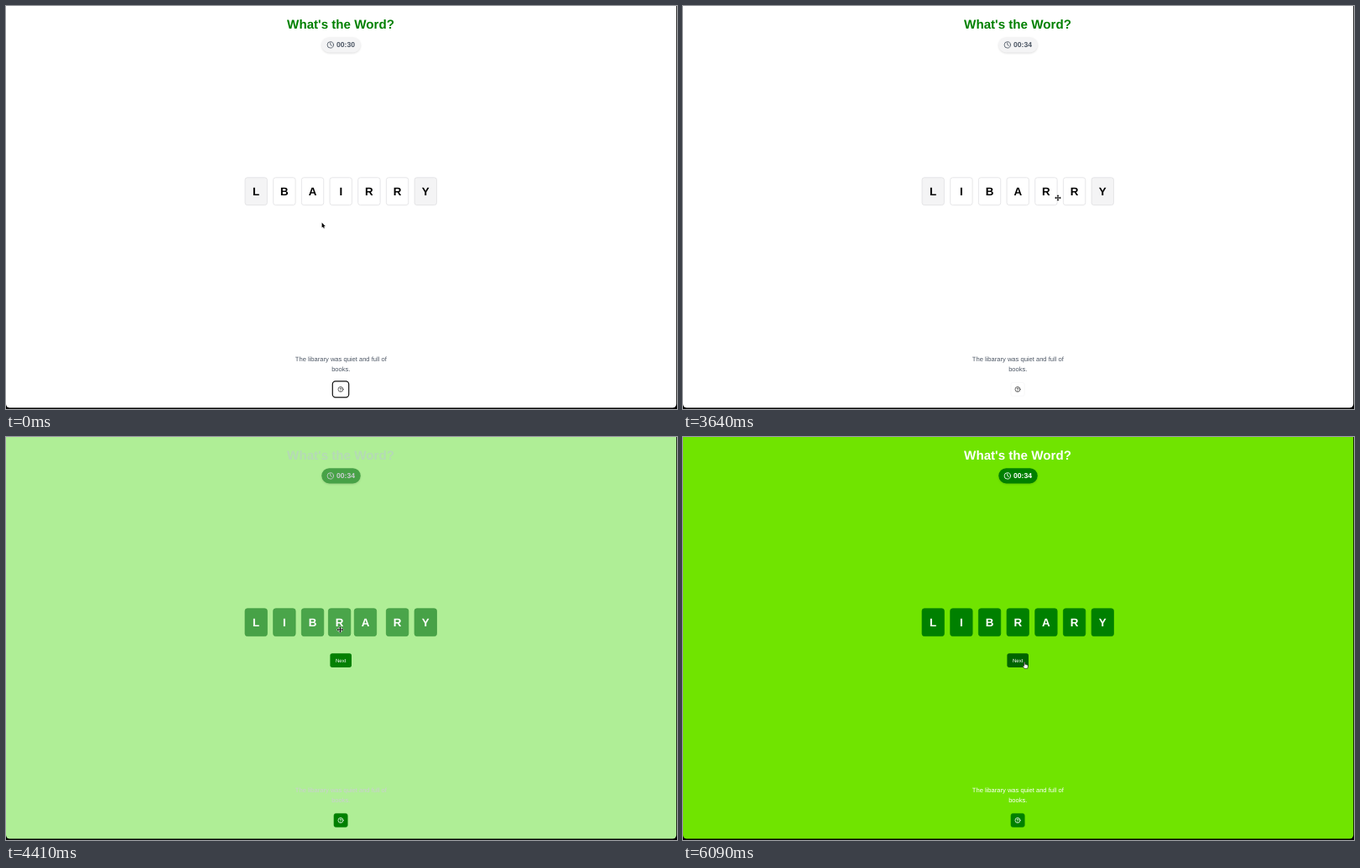
An HTML page for the animation above (6.16 s loop, 800x481 px).

```html
<!DOCTYPE html>
<html lang="en">
<head>
<meta charset="utf-8">
<title>Word game</title>
<style>
  html, body { margin: 0; width: 100%; height: 100%; overflow: hidden; background: #000; }
  svg { display: block; width: 800px; height: 481px; }
  text { font-family: "Liberation Sans", Arial, sans-serif; text-anchor: middle; text-rendering: geometricPrecision; }
  .bold { font-weight: bold; }
  #pill { filter: drop-shadow(0 1px 1px rgba(0, 0, 0, .13)); }
</style>
</head>
<body>
<svg viewBox="0 0 800 481">
  <rect width="800" height="481"/>
  <rect id="page" x="0" y="-10" width="799.2" height="489.5" rx="4.5"/>
  <text id="title" class="bold" x="399" y="27.4" font-size="15.15">What's the Word?</text>
  <rect id="pill" x="376.3" y="37.2" width="46.4" height="18.2" rx="9.1"/>
  <g id="clock" fill="none" stroke-width=".85" stroke-linecap="round">
    <circle cx="386.8" cy="46.4" r="3.7"/>
    <path d="M386.8 44V46.4L388.4 47.3"/>
  </g>
  <text id="time" class="bold" x="405" y="49.4" font-size="8.6"></text>
  <g id="tiles"></g>
  <g id="next">
    <rect id="nextBox" x="386.4" y="258.3" width="25.6" height="16.6" rx="2.6"/>
    <text x="399.2" y="268.8" font-size="6.1" fill="#fff">Next</text>
  </g>
  <g id="hint" font-size="7.57">
    <text x="399.3" y="424">The libarary was quiet and full of</text>
    <text x="399.3" y="435.8">books.</text>
  </g>
  <rect id="focus" x="389.3" y="447.8" width="19.4" height="19.4" rx="3.6" fill="#fff" stroke="#111" stroke-width="1.2"/>
  <rect id="help" x="391" y="449.4" width="16.2" height="16.2" rx="2.4" stroke-width=".6"/>
  <g id="helpIcon" fill="none" stroke-width=".75" stroke-linecap="round">
    <circle cx="399" cy="457.5" r="3"/>
    <path d="M398.1 456.8Q398.2 455.9 399.1 455.9T400 456.8Q399.9 457.3 399 457.9M399 459.1V459.2"/>
  </g>
  <g id="cursor" stroke-linejoin="round">
    <path d="M0 0V6L1.4 4.8L2.3 6.8L3.2 6.4L2.4 4.5H4.2Z" fill="#000" stroke="#fff" stroke-width=".5" paint-order="stroke"/>
    <g id="move"></g>
    <path d="M-.6 .3Q0-.5 .6 .3V2.8Q1.6 2.3 2 3Q3 2.7 3.3 3.5Q4.3 3.5 4.2 4.4L3.6 7.6H-.2L-2.2 4.8Q-2 4.1 -.6 4.7Z" fill="#fff" stroke="#000" stroke-width=".55"/>
  </g>
</svg>
<script>
const LOOP = 6160, SOLVED = 4175, FADE = 520;
const $ = id => document.getElementById(id);
const set = (el, name, value) => el.setAttribute(name, value);
const WHITE = [255, 255, 255], GREEN = [0, 128, 0], LIME = [112, 228, 0];
const PALE = [244, 244, 245], LINE = [222, 222, 224], SLATE = [75, 85, 99];

const ramp = (t, from, span) => Math.max(0, Math.min(1, (t - from) / span));
const lerp = (a, b, p) => a.map((v, i) => v + (b[i] - v) * p);
const rgb = c => `rgb(${c.map(Math.round)})`;
const mix = (a, b, p) => rgb(lerp(a, b, p));
const square = c => c.map(v => v * v);
const mixSquared = (a, b, p) => rgb(lerp(square(a), square(b), p).map(Math.sqrt));

function bezier(x1, y1, x2, y2) {
  const at = (a, b, s) => 3 * a * s * (1 - s) ** 2 + 3 * b * s * s * (1 - s) + s ** 3;
  return x => {
    let lo = 0, hi = 1;
    for (let i = 0; i < 20; i++) {
      const mid = (lo + hi) / 2;
      if (at(x1, x2, mid) < x) lo = mid; else hi = mid;
    }
    return x <= 0 ? 0 : x >= 1 ? 1 : at(y1, y2, lo);
  };
}
const easeOut = bezier(0, 0, .58, 1), standard = bezier(.4, 0, .2, 1);
const smooth = x => x * x * (3 - 2 * x);

// Each move: start, end, goal
const travel = (t, from, moves) => moves.reduce(
  (at, [start, end, ...goal]) => lerp(at, goal, smooth(ramp(t, start, end - start))), from);

const slot = i => 298.2 + 33.68 * i;
const shift = (t, start, from) => slot(from + standard(ramp(t, start, 400)));
const dragI = t => travel(t, [slot(3)], [[1960, 2450, 337], [2540, 2680, slot(1)]])[0];
const dragR = t => travel(t, [slot(4)], [[3850, 4270, 400.5], [4270, 4410, 397.6], [4550, 4690, slot(3)]])[0];
const pointer = t => travel(t, [376.6, 258.6], [
  [1330, 1820, 400, 228],
  [1960, 2450, 337, 227],
  [2590, 3290, 447, 229],
  [3850, 4270, 400.6, 230],
  [4270, 4410, 398.4, 230],
  [4410, 4550, 400.6, 230],
  [4550, 4690, 428, 249.5],
  [4690, 5530, 440, 268],
  [6020, 6085, 407.2, 268.7]
]);

// The dragged letters come last so they lie on top
const tiles = [
  ["L", () => slot(0), PALE],
  ["B", t => shift(t, 2235, 1), WHITE],
  ["A", t => t < SOLVED ? shift(t, 2050, 2) : shift(t, SOLVED, 3), WHITE],
  ["R", () => slot(5), WHITE],
  ["Y", () => slot(6), PALE],
  ["I", dragI, WHITE],
  ["R", dragR, WHITE]
].map(([letter, x, fill]) => {
  const g = document.createElementNS("http://www.w3.org/2000/svg", "g");
  g.innerHTML = `<rect x="-13.2" y="204.8" width="26.4" height="32.8" rx="2.8" stroke-width=".75"/>
    <text class="bold" y="225.6" font-size="13.4">${letter}</text>`;
  $("tiles").append(g);
  return { g, box: g.children[0], label: g.children[1], x, fill };
});

// Four arrows around a centre, with a white halo below
const arrows = look => [0, 90, 180, 270].map(a =>
  `<path d="M-.5 0V-2.2H-1.4L0-3.8L1.4-2.2H.5V0Z" transform="rotate(${a})" ${look}/>`).join("");
$("move").innerHTML = arrows('fill="#fff" stroke="#fff"') + arrows("");

function render(t) {
  const solved = t >= SOLVED;
  const p = standard(ramp(t, SOLVED, FADE));
  const ink = mix(SLATE, WHITE, p);
  set($("page"), "fill", mixSquared(WHITE, LIME, easeOut(ramp(t, SOLVED, 500))));
  set($("title"), "fill", mix(GREEN, WHITE, p));
  set($("pill"), "fill", mix(PALE, GREEN, p));
  set($("clock"), "stroke", ink);
  set($("time"), "fill", ink);
  set($("hint"), "fill", ink);
  $("time").textContent = "00:" + Math.min(34, 30 + Math.floor((t + 780) / 1000));

  for (const { g, box, label, x, fill } of tiles) {
    set(g, "transform", `translate(${x(t)})`);
    set(box, "fill", mix(fill, GREEN, p));
    set(box, "stroke", mix(LINE, GREEN, p));
    set(label, "fill", solved ? "#fff" : "#000");
  }

  const hover = t >= 6050, focused = t < 1820;
  const shown = ramp(t, 4215, 200);
  set($("next"), "opacity", shown);
  set($("nextBox"), "fill", hover ? "#006400" : mix([0, 10, 0], GREEN, shown));

  const tint = ramp(t, SOLVED, 110);
  set($("focus"), "opacity", focused ? 1 : 0);
  set($("help"), "fill", mix(WHITE, GREEN, tint));
  set($("help"), "stroke", focused ? "none" : mix(PALE, GREEN, tint));
  set($("helpIcon"), "stroke", solved ? "#fff" : "#333");

  const kind = hover ? 2 : t >= 1600 && t < 4600 ? 1 : 0;
  set($("cursor"), "transform", `translate(${pointer(t).join(" ")})`);
  [...$("cursor").children].forEach((el, i) => set(el, "visibility", i === kind ? "visible" : "hidden"));
}

const start = performance.now();
function tick() {
  render((performance.now() - start) % LOOP);
  requestAnimationFrame(tick);
}
tick();
</script>
</body>
</html>
```
